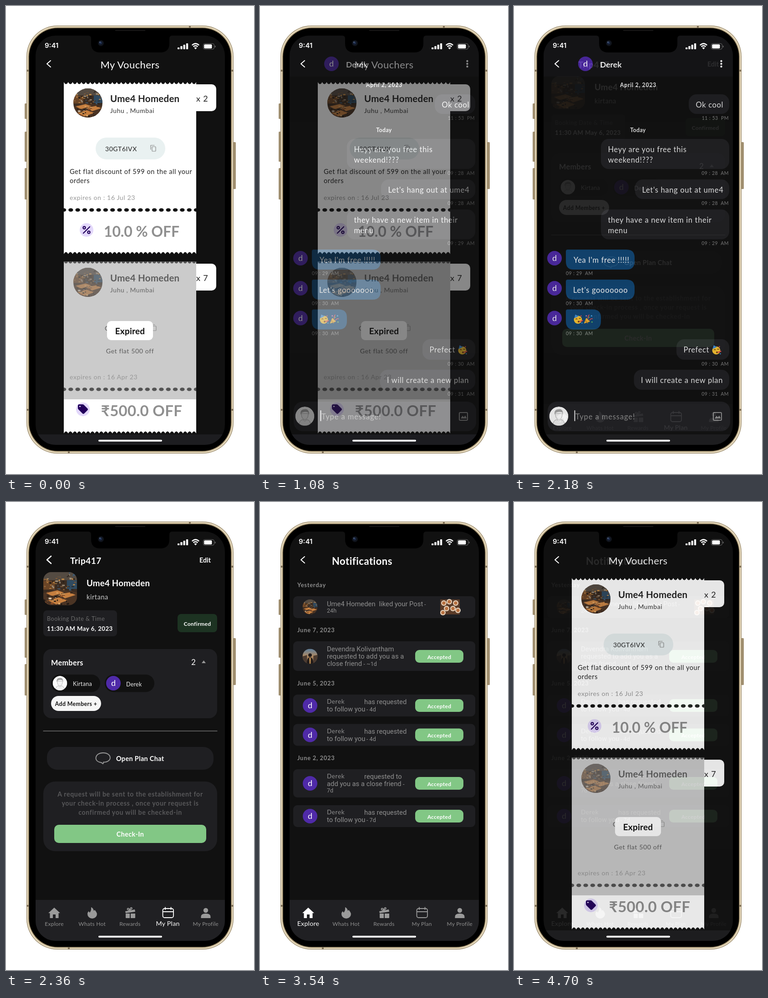
These frames come from a looping animation (545 by 1028 pixels, 4720 ms). An HTML page:

```html
<!DOCTYPE html>
<html lang="en">
<head>
<meta charset="utf-8">
<title>App screens</title>
<style>
html, body { margin: 0; width: 100%; height: 100%; overflow: hidden; background: #fff; }
svg { display: block; width: 100%; height: 100%; }
text { font-family: Lato, "Open Sans", sans-serif; white-space: pre; }
text.r { font-family: Roboto, Arial, sans-serif; }
text.i { font-family: Inter, Roboto, sans-serif; }
</style>
</head>
<body>
<svg id="stage" viewBox="0 0 545 1028" xmlns="http://www.w3.org/2000/svg"></svg>
<script>
const HOLD = 1000, STEP = 20, SLOT = 1180;
const PANEL = '#1f1f22', GREY = '#8f8f8f', VIOLET = '#4f2aa8', GREEN = '#82c785';
const VENUE = 'Ume4 Homeden', FRIEND = 'Derek', HOST = 'Kirtana';

const attrs = o => Object.entries(o).map(([k, v]) => ` ${k}="${v}"`).join('');
const box = (x, y, x2, y2, r, fill, more = {}) =>
  `<rect${attrs({ x, y, width: x2 - x, height: y2 - y, rx: r, fill, ...more })}/>`;
const disc = (cx, cy, r, fill, more = {}) => `<circle${attrs({ cx, cy, r, fill, ...more })}/>`;
const path = (d, fill, more = {}) => `<path${attrs({ d, fill, ...more })}/>`;
const line = (d, stroke, width, more = {}) => path(d, 'none', {
  stroke, 'stroke-width': width, 'stroke-linecap': 'round', 'stroke-linejoin': 'round', ...more });
const text = (x, y, size, str, fill = '#fff', spacing = 0.04 * size, more = {}) =>
  `<text${attrs({ x, y, 'font-size': size, fill, 'letter-spacing': spacing, ...more })}>${str.replace(/&/g, '&amp;')}</text>`;
const bold = (x, y, size, str, fill, spacing, more) =>
  text(x, y, size, str, fill, spacing, { 'font-weight': 700, ...more });
const MID = { 'text-anchor': 'middle' }, END = { 'text-anchor': 'end' };
const at = (x, y, s, body) => `<g transform="translate(${x} ${y}) scale(${s})">${body}</g>`;
const times = (n, f) => Array.from({ length: n }, (_, i) => f(i)).join('');

function randomFrom(seed) {
  return () => (seed = (seed * 16807) % 2147483647) / 2147483647;
}

// Pictures, drawn in a 100 x 100 square
function specks(seed, n, y0, y1, colors) {
  const rnd = randomFrom(seed);
  return times(n, () => {
    const x = rnd() * 96, y = y0 + rnd() * (y1 - y0), w = 2 + rnd() * 7, h = 1.5 + rnd() * 4;
    return box(x, y, x + w, y + h, 0.5, colors[Math.floor(rnd() * colors.length)]);
  });
}
const cafeArt = box(0, 0, 100, 100, 0, '#3b2c21') +
  box(0, 0, 100, 24, 0, '#544b42') + box(70, 24, 100, 50, 0, '#2f4a60') +
  box(0, 26, 34, 52, 0, '#6b4526') +
  specks(11, 55, 0, 52, ['#8d6137', '#2a211b', '#9a8a76', '#c28a45', '#3d5870', '#6f5238']) +
  path('M0 62L40 50L100 60V100H0Z', '#4b3424') +
  path('M8 62l34-8 20 7-36 10z M48 66l30-6 18 8-32 10z M14 84l32-9 26 9-34 12z', '#c67f3f') +
  specks(29, 32, 56, 96, ['#211813', '#dda766', '#8a4f28', '#332419', '#d8c7ae']);
const selfieArt = box(0, 0, 100, 100, 0, 'url(#dusk)') +
  path('M0 50L30 42V100H0Z M72 46L100 40V100H72Z', '#4c3b30') +
  disc(50, 42, 12, '#201a1a') + path('M28 100Q28 58 50 56Q72 58 72 100Z', '#201a1a') +
  path('M44 60h12l-2 40h-8z', '#b98a4e');
const sketchArt = disc(50, 50, 50, '#fbfbfb') +
  path('M20 92Q22 70 40 68L50 76L60 68Q78 70 80 92Q50 108 20 92Z', '#f1f1f1', { stroke: '#999', 'stroke-width': 2 }) +
  path('M32 36Q32 66 50 68Q68 66 68 36Z', '#f4f4f4', { stroke: '#999', 'stroke-width': 2 }) +
  path('M28 42Q24 16 46 14Q72 8 73 42L66 30Q50 24 34 32Z', '#a5a5a5');
const clipped = (x, y, size, art, shape) => at(x, y, size / 100, `<g clip-path="url(#${shape})">${art}</g>`);
const round = (cx, cy, r, art) => clipped(cx - r, cy - r, 2 * r, art, 'disc');
const initial = (cx, cy, r = 16) => disc(cx, cy, r, VIOLET) +
  text(cx, cy + 6, 18, 'd', '#fff', 0, MID);

const food = box(396, 214, 439, 247, 0, '#5a3b28') +
  [[404, 222], [416, 219], [430, 222], [410, 234], [424, 234], [435, 238], [402, 243]].map(([x, y]) =>
    disc(x, y, 6, '#e6d3bd') + disc(x, y, 3.8, '#b9703f')).join('');

// Emoji, centred on the origin
const partyFace = disc(-0.5, 1, 8.5, '#fbc531') + path('M-8-2L-6-10L1-6Z', '#3f8fd8') +
  line('M-5 0q1.5-2 3 0M2-1q1.5-2 3 0', '#5b3a12', 1.2) + disc(1, 5, 1.8, '#6b3d14') +
  line('M3 5l6-2', '#e5484d', 2.2) + disc(6, -7, 1.2, '#e5484d') + disc(8, 8, 1.2, '#43a0e0');
const popper = path('M-9 9L-4-3L4 5Z', '#f2b632') + line('M-6 3l5 5', '#c77d1e', 1.5) +
  line('M0-1q-1-5 2-8M3 2q3-4 6-3', '#e5484d', 1.6) + disc(7, -7, 1.5, '#43a0e0') +
  disc(-4, -7, 1.3, '#e879b9') + disc(8, 6, 1.4, '#57b560') + disc(2, -4, 1.2, '#57b560');

// Screen parts
const back = w => line(`M${98 + w} ${120 - w}L90 127L${98 + w} ${134 + w}`, '#fff', 2 + w * 0.6);
const footer = box(65, 941, 481, 964, 0, '#1d1d20');
const screen = (id, body) =>
  `<g id="${id}" clip-path="url(#glass)">${box(65, 65, 481, 964, 0, '#111')}${body}</g>`;

const copyIcon = (x, y) => line(`M${x} ${y + 9}V${y}H${x + 8}`, '#888', 1.2) +
  box(x + 3, y + 3, x + 11, y + 13, 1, 'none', { stroke: '#888', 'stroke-width': 1.2 });

function ticket(top, count, code, icon, note, expiry, amount) {
  const n = 30, w = 291 / n;
  const outline = `M127 ${top}` + times(n, () => `q${w / 2} 9 ${w} 0`) + 'v378' +
    times(n, () => `q${-w / 2}-9 ${-w} 0`) + 'z';
  return box(395, top + 5, 462, top + 64, 10, '#fff') + text(418, top + 43, 18, 'x ' + count, '#222', 0.8) +
    path(outline, '#fff') + round(180, top + 46, 32, cafeArt) +
    bold(229, top + 44, 20.5, VENUE, '#222', 0.25) + text(229, top + 68, 14, 'Juhu , Mumbai', '#333') +
    code + note + text(140, top + 259, 14.2, expiry, '#999') +
    times(20, i => `<ellipse cx="${127 + i * 291 / 19}" cy="${top + 281}" rx="5.2" ry="3.8" fill="#111"/>`) +
    icon + amount;
}

const percent = disc(177, 492, 15, '#e3d8fb') + line('M170 499L184 485', '#23005c', 2.4) +
  [[172, 487], [182, 497]].map(([x, y]) => disc(x, y, 2.6, 'none', { stroke: '#23005c', 'stroke-width': 2.2 })).join('');
const tag = disc(169, 886, 15, '#e3d8fb') +
  path('M158 878q0-3 3-3h7q2 0 3 1l8 8q2 2 0 4l-7 7q-2 2-4 0l-9-9q-1-1-1-3z', '#23005c') + disc(162.5, 879.5, 1.6, '#e3d8fb');

const vouchers = back(0) + text(272.5, 137, 22, 'My Vouchers', '#fff', 0.4, MID) +
  ticket(167, 2,
    box(197, 289, 350, 337, 24, '#e9f1f1') + text(218, 319, 14, '30GT6IVX', '#222') + copyIcon(318, 306),
    percent,
    text(140, 369, 14.5, 'Get flat discount of 599 on the all your', '#222') + text(140, 389, 14.5, 'orders', '#222'),
    'expires on : 16 Jul 23', bold(298, 507, 32, '10.0 % OFF', GREY, -0.1, MID)) +
  ticket(561, 7,
    text(217, 713, 14, 'C', '#222') + copyIcon(319, 700), '',
    text(272.5, 763, 14.2, 'Get flat 500 off', '#222', 0.55, MID),
    'expires on : 16 Apr 23', bold(298, 901, 33, '₹500.0 OFF', GREY, 0.3, MID)) +
  box(127, 561, 418, 864, 0, '#979797', { opacity: 0.5 }) + tag +
  box(222, 692, 323, 734, 9, '#fff') + bold(272.5, 721, 19, 'Expired', '#111', 0.2, MID) + footer;

function sent(x, y, y2, lines, stamp) {
  return box(x, y, 473, y2, 17, '#212124') +
    lines.map((s, i) => text(x + 15.5, y + 29 + i * 23.3, 16.5, s, '#f1f1f1')).join('') +
    text(472, y2 + 12.5, 10.5, stamp, '#858585', 0.5, END);
}
function received(y, x2, body, stamp) {
  return initial(89, y + 19) +
    path(`M118 ${y}H${x2 - 18}q18 0 18 18v8q0 18-18 18H131q-17 0-17-18V${y + 4}q0-4 4-4z`, '#104674') +
    body + text(114, y + 56, 10.5, stamp, '#858585', 0.5);
}
const chat = box(65, 65, 481, 155, 0, '#161618') + back(0) + initial(157, 127) +
  bold(189, 134.5, 17.5, FRIEND, '#fff', 0) + [121, 127, 133].map(y => disc(455.5, y, 2.2, '#fff')).join('') +
  bold(273, 178, 12.3, 'April 2, 2023', '#eee', 0.7, MID) + bold(272.5, 277, 12.3, 'Today', '#eee', 0.4, MID) +
  sent(384, 194, 237, ['Ok cool'], '11 : 53  PM') +
  sent(191, 292, 358, ['Heyy are you free this', 'weekend!???'], '09 : 28  AM') +
  sent(266, 381, 424, ["Let's hang out at ume4"], '09 : 28  AM') +
  sent(191, 447, 512.5, ['they have a new item in their', 'menu'], '09 : 29  AM') +
  received(535, 265, text(131, 564, 16.5, "Yea I'm free !!!!!"), '09 : 29  AM') +
  received(601, 265, text(130, 630, 16.5, "Let's gooooooo"), '09 : 30  AM') +
  received(666.5, 191, at(141, 688, 1.05, partyFace) + at(163, 688, 1.05, popper), '09 : 30  AM') +
  sent(357, 732, 777, ['Prefect'], '09 : 30  AM') + at(445, 755.5, 1.05, partyFace) +
  sent(263.5, 799, 843, ['I will create a new plan'], '09 : 31  AM') +
  box(74, 869, 475, 934, 20, '#212124') + round(98.5, 901, 21, sketchArt) +
  line('M133.5 889V911', '#fff', 1.8) + text(135, 908, 16.5, 'Type a message!', GREY, 0.9) +
  box(438, 893, 456, 910, 2, 'none', { stroke: GREY, 'stroke-width': 2 }) +
  path('M441 906l4-6 3 3.5 3-4 3.5 6.5z', GREY) + footer;

const TABS = [
  ['Explore', c => path('M106 891L93 903H96.5V914H103V906H109V914H115.5V903H119Z', c)],
  ['Whats Hot', c => path('M187 890q5 2 6 8l2-2q5 6 5 9a10.5 10 0 0 1-21 0q0-4 3-6 1 2 2 3q4-5 3-12z', c)],
  ['Rewards', c => path('M262 899l21-4 1 5-21 3z M263 904h9v10h-8q-1 0-1-1z M274 904h10v9q0 1-1 1h-9z', c) +
    line('M272 897q-7-1-5-4 3-2 5 4q1-7 4-6 3 2-3 5', c, 1.8)],
  ['My Plan', c => box(344.5, 893, 368, 913, 4, 'none', { stroke: c, 'stroke-width': 1.8 }) +
    line('M345 900H367.5M350 890.5V895M362.5 890.5V895', c, 1.8)],
  ['My Profile', c => disc(439, 897, 5.2, c) + path('M428.5 914v-3q0-7 10.5-7t10.5 7v3z', c)]
];
const nav = active => box(65, 874, 481, 964, 0, '#202023') + TABS.map(([label, icon], i) => {
  const on = i === active, color = on ? '#fff' : GREY;
  return icon(on ? '#fff' : '#9a9a9a') + text(106 + i * 83.2, 930.5, on ? 14.2 : 12, label, color, 0.25, MID);
}).join('');

const request = ['A request will be sent to the establishment for',
  'your check-in process , once your request is', 'confirmed you will be checked-in'];
const plan = back(1) + bold(141, 135.5, 19, 'Trip417', '#fff', 0.5) + bold(425, 133, 14.3, 'Edit', '#fff', 0) +
  clipped(82, 154, 74, cafeArt, 'soft') + bold(177, 184.5, 18.7, VENUE, '#fff', 0.25) +
  text(177, 214, 14.5, HOST.toLowerCase(), '#ccc') +
  box(82, 238, 244, 295, 8, PANEL) + text(90, 260.5, 12.5, 'Booking Date & Time', '#6b6b6b', 0.55) +
  bold(90, 283, 13.2, '11:30 AM May 6, 2023', '#fff', 0.5) +
  box(377, 246, 464, 286, 8, '#1d3322') + bold(420.5, 272, 12.2, 'Confirmed', '#fff', 0.3, MID) +
  box(82, 323, 464, 475, 18, PANEL) + bold(99, 358.5, 16.3, 'Members', '#fff', 0.3) +
  text(407, 358, 17, '2') + path('M430 354L434.5 348L439 354Z', '#999') +
  box(99, 379, 207, 417.5, 19, '#111') + round(118.5, 398, 16, sketchArt) + text(147, 404, 12.6, HOST, '#eee', 0.3) +
  box(217, 379, 326, 417.5, 19, '#111') + initial(236, 398) + text(264, 405, 12.6, FRIEND, '#eee', 0.2) +
  box(99, 426, 209, 459, 16.5, '#f6f6f6') + bold(154, 448, 12.3, 'Add Members +', '#111', 0.4, MID) +
  line('M82 503H464', '#a0a0a0', 1.2) +
  box(90, 538, 456, 588, 22, PANEL) +
  line('M213 575c-2-2-3-3-5-3C191 569 196 551 213 551C234 551 234 572 214 571.5q1 2-1 3.5z', '#999', 1.8) +
  bold(242, 569, 14.4, 'Open Plan Chat', '#fff', 0.35) +
  box(82, 614, 464, 767, 26, PANEL) +
  request.map((s, i) => bold(273, 646.5 + i * 20.2, 14.2, s, '#58585a', 0.63, MID)).join('') +
  box(106, 709, 440, 749, 10, GREEN) + bold(273, 735, 14.4, 'Check-In', '#fff', 0.4, MID) + nav(3);

const feed = (x, y, str, size = 14.8) => text(x, y, size, str, GREY, 0, { class: 'r' });
const card = (y, y2) => box(73, y, 473, y2, 9, PANEL);
const accepted = cy => box(341, cy - 14, 447, cy + 14, 9, GREEN) +
  bold(394, cy + 5.5, 12, 'Accepted', '#fff', 0.3, MID);
const heading = (y, str) => bold(82, y, 12.9, str, '#8c8c8c', 0.75);
const follow = (y, age) => card(y, y + 48) + initial(110, y + 24) +
  text(147, y + 20, 13.6, FRIEND, GREY, 0.6) + feed(229, y + 21, 'has requested') +
  feed(147, y + 37, 'to follow you') + feed(234, y + 37, `- ${age}`, 12.6) + accepted(y + 24);

const notifications = back(0) + bold(158, 137.5, 22, 'Notifications', '#fff', 0.5) +
  heading(186.5, 'Yesterday') + card(207, 255) + round(110, 230.5, 16.5, cafeArt) +
  feed(147, 229, VENUE) + feed(261.5, 229, 'liked your Post') + feed(361, 229, '-', 12.6) + feed(147, 243, '24h', 12.6) + food +
  heading(286, 'June 7, 2023') + card(306, 371) + round(110, 339, 16.5, selfieArt) +
  feed(147, 328, 'Devendra Kolivantham') + feed(147, 344, 'requested to add you as a') +
  feed(147, 360, 'close friend') + feed(227.5, 360, '- ~1d', 12.6) + accepted(339) +
  heading(402.5, 'June 5, 2023') + follow(423, '4d') + follow(487.5, '4d') +
  heading(567, 'June 2, 2023') + card(587, 649) + initial(110, 618) +
  text(147, 607, 13.6, FRIEND, GREY, 0.6) + feed(229, 608, 'requested to') +
  feed(147, 624, 'add you as a close friend') + feed(314, 624, '-', 12.6) + feed(147, 638, '7d', 12.6) + accepted(618) +
  follow(666, '7d') + nav(0);

// Phone body and status bar
const phone =
  [[214, 248], [276, 342], [356, 425]].map(([a, b]) => box(41, a, 47, b, 1.5, '#a08f70')).join('') +
  box(498, 299, 505, 402, 1.5, '#a08f70') +
  box(45, 43, 500, 983, 68, '#94825f') + box(46.2, 44.2, 498.8, 981.8, 67, '#eadfc6') +
  box(48.5, 46.5, 496.5, 979.5, 65, '#b3a07a') + box(50.5, 48.5, 494.5, 977.5, 63, '#000') +
  line('M45.5 142H50M45.5 887H50M495 142H499.5M495 887H499.5M404 44V48M138 978V982.5', '#82735a', 4, { 'stroke-linecap': 'butt' });
const status =
  path('M181 65q6 0 6 7v10q0 20 20 20h132q20 0 20-20v-10q0-7 6-7z', '#000') +
  line('M241 53.5H305', '#161616', 2.5) + disc(208.5, 81.5, 6.5, '#10141c') + disc(208, 81, 3.2, '#1c2a47') + disc(206.5, 79.5, 1.1, '#7d92b5') +
  text(85, 92, 15, '9:41', '#fff', 0, { class: 'i', 'font-weight': 600 }) +
  times(4, i => box(377 + i * 6.3, 91 - i * 3, 381.3 + i * 6.3, 95, 1, '#fff')) +
  line('M408.8 86.2Q416.5 79 424.2 86.2M411.6 89.4Q416.5 85.2 421.4 89.4', '#fff', 2.5, { 'stroke-linecap': 'butt' }) +
  path('M413.4 91.8Q416.5 89.6 419.6 91.8L416.5 95.2Z', '#fff') +
  box(433.5, 82.5, 457.5, 95, 3.6, 'none', { stroke: '#6d6d6d', 'stroke-width': 1 }) +
  box(435.3, 84.2, 452.5, 93.3, 2, '#fff') + box(459, 87, 460.6, 91, 0.8, '#6d6d6d') +
  line('M205 954.8H341', '#fff', 4);

const defs = `<defs>
  <clipPath id="glass">${box(65, 65, 481, 964, 44, '#000')}</clipPath>
  <clipPath id="disc">${disc(50, 50, 50, '#000')}</clipPath>
  <clipPath id="soft">${box(0, 0, 100, 98, 24, '#000')}</clipPath>
  <linearGradient id="dusk" x2="0" y2="1"><stop stop-color="#5f7f9c"/><stop offset=".5" stop-color="#b08a62"/><stop offset="1" stop-color="#5a4638"/></linearGradient>
</defs>`;

const screens = { vouchers, chat, plan, notifications };
document.getElementById('stage').innerHTML = defs + phone +
  Object.entries(screens).map(([id, body]) => screen(id, body)).join('') + status;
const layers = Object.keys(screens).map(id => document.getElementById(id));

function render(ms) {
  const time = ms % (SLOT * layers.length);
  const current = Math.floor(time / SLOT), phase = time % SLOT;
  const next = (current + 1) % layers.length;
  const mix = phase < HOLD ? 0 : (Math.floor((phase - HOLD) / STEP) + 1) / 10;
  // The upper layer of the pair carries the fade; the lower one stays opaque.
  const upper = Math.max(current, next);
  layers.forEach((layer, i) => {
    const shown = i === current || (i === next && mix > 0);
    layer.style.display = shown ? '' : 'none';
    layer.style.opacity = i !== upper ? 1 : i === current ? 1 - mix : mix;
  });
}

const start = performance.now();
function tick() {
  render(performance.now() - start);
  requestAnimationFrame(tick);
}
tick();
</script>
</body>
</html>
```
